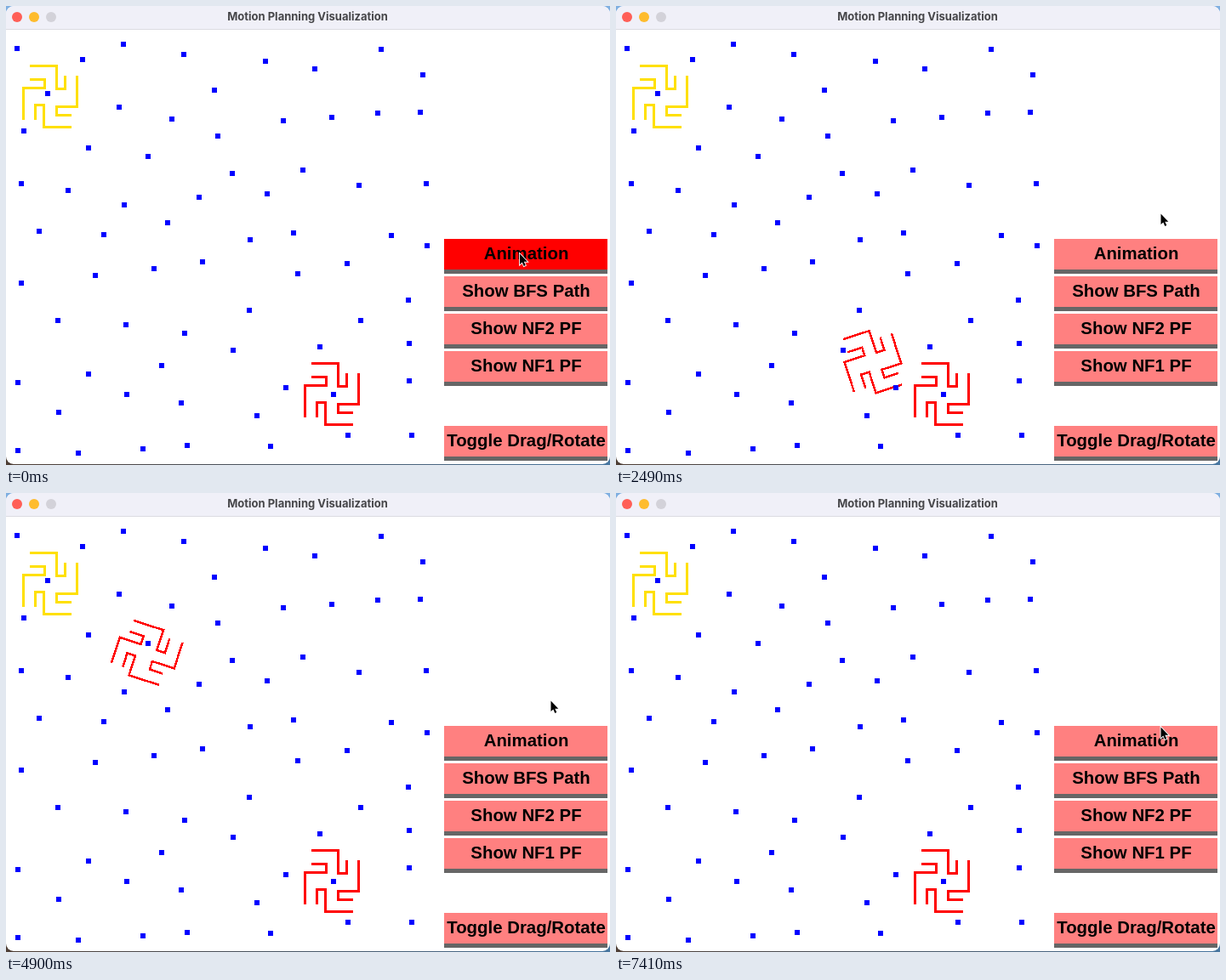
These frames come from a looping animation (710 px wide and 540 px high, 7470 ms). An HTML page:

```html
<!DOCTYPE html>
<html lang="en">
<head>
<meta charset="utf-8">
<title>Motion Planning Visualization</title>
<style>
  html, body { margin: 0; width: 100%; height: 100%; overflow: hidden; }
  svg { display: block; }
  .title { font: 700 13px Inter, sans-serif; fill: #464649; }
  .label { font: 700 20.4px "Liberation Sans", Arial, sans-serif; }
  text { text-anchor: middle; }
  .robot { fill: none; stroke-width: 3; shape-rendering: crispEdges; }
</style>
</head>
<body>
<svg width="710" height="540" viewBox="0 0 710 540">
  <defs>
    <linearGradient id="desktop">
      <stop offset="0" stop-color="#4d3d34"/>
      <stop offset="1" stop-color="#47759f"/>
    </linearGradient>
    <clipPath id="frame"><rect width="710" height="539" rx="9"/></clipPath>
    <path id="arms" d="M-24.5-36h32v27h10v-16
      M-24.5-20h18v10h-25v37
      M-17.5 27v-17h10v26h32
      M31.5-25v37h-24v10h17"/>
  </defs>
  <rect width="710" height="270" fill="#7eaee0"/>
  <rect y="270" width="710" height="270" fill="url(#desktop)"/>
  <g clip-path="url(#frame)">
    <rect width="710" height="540" fill="#fff"/>
    <rect width="710" height="27" fill="#f0f0f8"/>
    <rect y="27" width="710" height="1" fill="#dcdce2"/>
  </g>
  <circle cx="13" cy="13" r="6" fill="#ff5f57"/>
  <circle cx="33" cy="13" r="6" fill="#febc2e"/>
  <circle cx="53" cy="13" r="6" fill="#d3d2d9"/>
  <text class="title" x="354.5" y="17">Motion Planning Visualization</text>
  <use class="robot" href="#arms" x="383" y="456.5" stroke="#f00"/>
  <use class="robot" href="#arms" x="52" y="106.5" stroke="#ffe000"/>
  <use class="robot" href="#arms" id="mover" stroke="#f00"/>
  <path id="dots" fill="#00f"/>
  <g id="buttons"></g>
  <path id="cursor" d="M0 0v12.6l2.8-2.6 2 4.5 2-.9-2-4.3h4z" stroke="#fff" paint-order="stroke" stroke-width="1.8"/>
</svg>
<script>
const LOOP = 7470;
const PRESS = 410, RELEASE = 890, DEPART = 1470, ARRIVE = 6810, RETURN = 7410;
const byId = id => document.getElementById(id);

const obstacles = [
  13,50, 90,63, 138,45, 209,57, 305,65, 363,74, 441,51, 490,81, 49,103, 133,119,
  195,133, 245,99, 326,135, 383,131, 437,126, 487,125, 249,153, 21,147, 97,167,
  167,177, 266,197, 349,193, 18,209, 73,217, 139,234, 227,225, 307,221, 415,211,
  494,209, 39,265, 115,269, 190,255, 287,275, 338,267, 453,270, 495,282, 105,317,
  174,309, 231,301, 343,315, 401,303, 18,326, 61,370, 141,375, 210,385, 286,358,
  267,405, 369,401, 417,370, 473,346, 474,397, 474,441, 14,443, 97,433, 183,423,
  142,457, 206,467, 329,449, 385,457, 62,478, 295,482, 402,505, 477,505, 311,518,
  14,523, 85,526, 161,521, 213,517
];
let squares = '';
for (let i = 0; i < obstacles.length; i += 2)
  squares += `M${obstacles[i] - 3} ${obstacles[i + 1] - 3}h6v6h-6z`;
byId('dots').setAttribute('d', squares);

const labels = { 274: 'Animation', 318: 'Show BFS Path', 362: 'Show NF2 PF',
                 406: 'Show NF1 PF', 494: 'Toggle Drag/Rotate' };
byId('buttons').innerHTML = Object.entries(labels).map(([y, label]) => `
  <g transform="translate(515 ${y})">
    <rect y="5" width="192" height="36" fill="#666"/>
    <g><rect width="192" height="36" fill="#ff8080"/>
    <text class="label" x="96.5" y="24">${label}</text></g>
  </g>`).join('');
const animationTop = document.querySelector('#buttons g g');

// Robot path: time, x, y, angle
const route = [
  [DEPART, 382.5, 456, 0], [1590, 365, 453, 18], [1820, 338.5, 480, 18],
  [2050, 298, 470, 18], [2170, 298, 456, -18], [2380, 313, 427, -18],
  [2830, 267, 393, -18], [3170, 291.5, 365, -18], [3750, 229, 297, -18],
  [3850, 229, 295, 72], [3920, 230, 283.5, 72], [4400, 198, 242, 72],
  [4560, 187, 228, 108], [4670, 179.5, 218, 108], [4900, 165.5, 188.6, 108],
  [5080, 159, 165, 108], [5300, 170, 134, 108], [5440, 176, 121, 126],
  [5560, 178.5, 106.5, 90], [5740, 193, 83, 90], [5870, 170, 85, 72],
  [6210, 126, 113, 54], [6630, 52, 107, 36], [6750, 51.5, 106, 0]
];
const pointer = [
  [0, 604, 291.5], [169, 604, 291.5], [170, 604.5, 292.5], [930, 604.5, 292.5],
  [1120, 615, 276], [1470, 640.5, 244.5], [RETURN - 1, 640.5, 244.5], [RETURN, 640.5, 275.5]
];

// Screen refreshes: first, last, count
const bursts = [
  [890, 1590, 13], [1640, 2380, 14], [2440, 3170, 14], [3230, 3920, 13],
  [3980, 4670, 13], [4730, 5440, 13], [5500, 6210, 13], [6270, 6810, 10]
];

function refreshTime(t) {
  const burst = bursts.findLast(b => b[0] <= t);
  if (!burst) return t;
  const [first, last, count] = burst;
  const step = (last - first) / (count - 1);
  return first + step * Math.min(count - 1, Math.floor((t - first + 10) / step));
}

function sample(keys, t) {
  const next = keys.findIndex(k => k[0] > t);
  if (next < 0) return keys.at(-1).slice(1);
  if (next === 0) return keys[0].slice(1);
  const a = keys[next - 1], b = keys[next];
  const u = (t - a[0]) / (b[0] - a[0]);
  return a.slice(1).map((v, i) => v + (b[i + 1] - v) * u);
}

function draw(t) {
  const tick = refreshTime(t);
  const [x, y, angle] = sample(route, tick);
  const turn = 18 * Math.round(angle / 18);
  const mover = byId('mover');
  mover.style.display = tick > DEPART && t < ARRIVE ? '' : 'none';
  mover.style.strokeWidth = turn % 90 ? 2.5 : 3;
  mover.setAttribute('transform', `translate(${x + 0.5} ${y + 0.5}) rotate(${turn})`);

  const [px, py] = sample(pointer, t < RETURN ? tick : t);
  byId('cursor').setAttribute('transform', `translate(${px} ${py})`);

  const pressed = t >= PRESS && t < RELEASE;
  const hovered = tick < DEPART && py >= 274;
  animationTop.setAttribute('transform', `translate(0 ${pressed ? 5 : 0})`);
  animationTop.firstElementChild.setAttribute('fill', hovered ? '#f00' : '#ff8080');
}

const start = performance.now();
function loop() {
  draw((performance.now() - start) % LOOP);
  requestAnimationFrame(loop);
}
loop();
</script>
</body>
</html>
```
